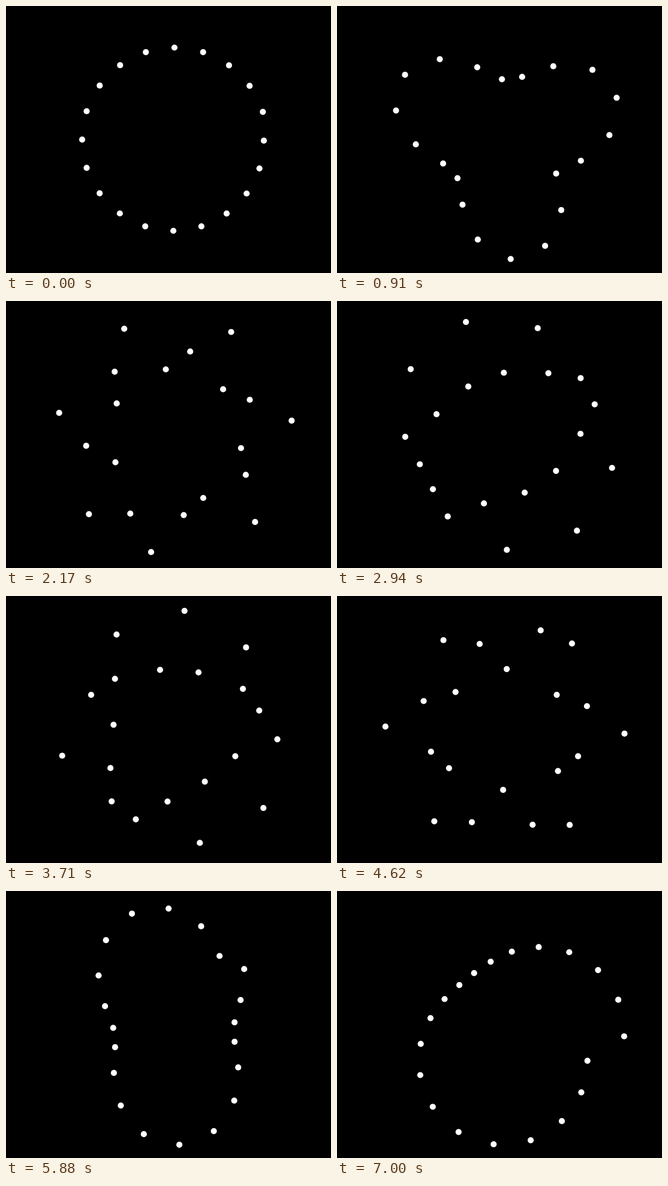
An HTML page for the animation above (7.07 s loop, 542 by 446 pixels).

```html
<!DOCTYPE html>
<html lang="en">
<head>
<meta charset="utf-8">
<title>Dots on a wave</title>
<style>
  html, body { margin: 0; width: 100%; height: 100%; overflow: hidden; background: #000; }
  svg { display: block; width: 542px; height: 446px; }
</style>
</head>
<body>
<svg viewBox="0 0 542 446" fill="#fff"></svg>
<script>
const COUNT = 20, STEP = 70, STEPS = 101;
const CENTER = { x: 280, y: 224 }, RADIUS = 150, SWING = 50;

// [step, phase in radians]; the pace is slightly uneven
const PACE = [[0, 0.006], [13, 0.8939], [31, 2.077], [53, 3.5443],
              [66, 4.428], [84, 5.6094], [100, 6.6914]];

const svg = document.querySelector('svg');
const dots = Array.from({ length: COUNT }, () => {
  const dot = document.createElementNS(svg.namespaceURI, 'circle');
  dot.setAttribute('r', 5.1);
  return svg.appendChild(dot);
});

function phaseAt(step) {
  const k = PACE.findIndex(([s], i) => i > 0 && step <= s);
  const [s0, p0] = PACE[k - 1], [s1, p1] = PACE[k];
  return p0 + (p1 - p0) * (step - s0) / (s1 - s0);
}

function draw(time) {
  const phase = phaseAt(Math.floor(time / STEP) % STEPS);
  dots.forEach((dot, i) => {
    const angle = phase + i * 2 * Math.PI / COUNT;
    const r = RADIUS + SWING * Math.sin(i * phase);
    dot.setAttribute('cx', CENTER.x + r * Math.cos(angle));
    dot.setAttribute('cy', CENTER.y + r * Math.sin(angle));
  });
}

const start = performance.now();
function tick() {
  draw(performance.now() - start);
  requestAnimationFrame(tick);
}
tick();
</script>
</body>
</html>
```
